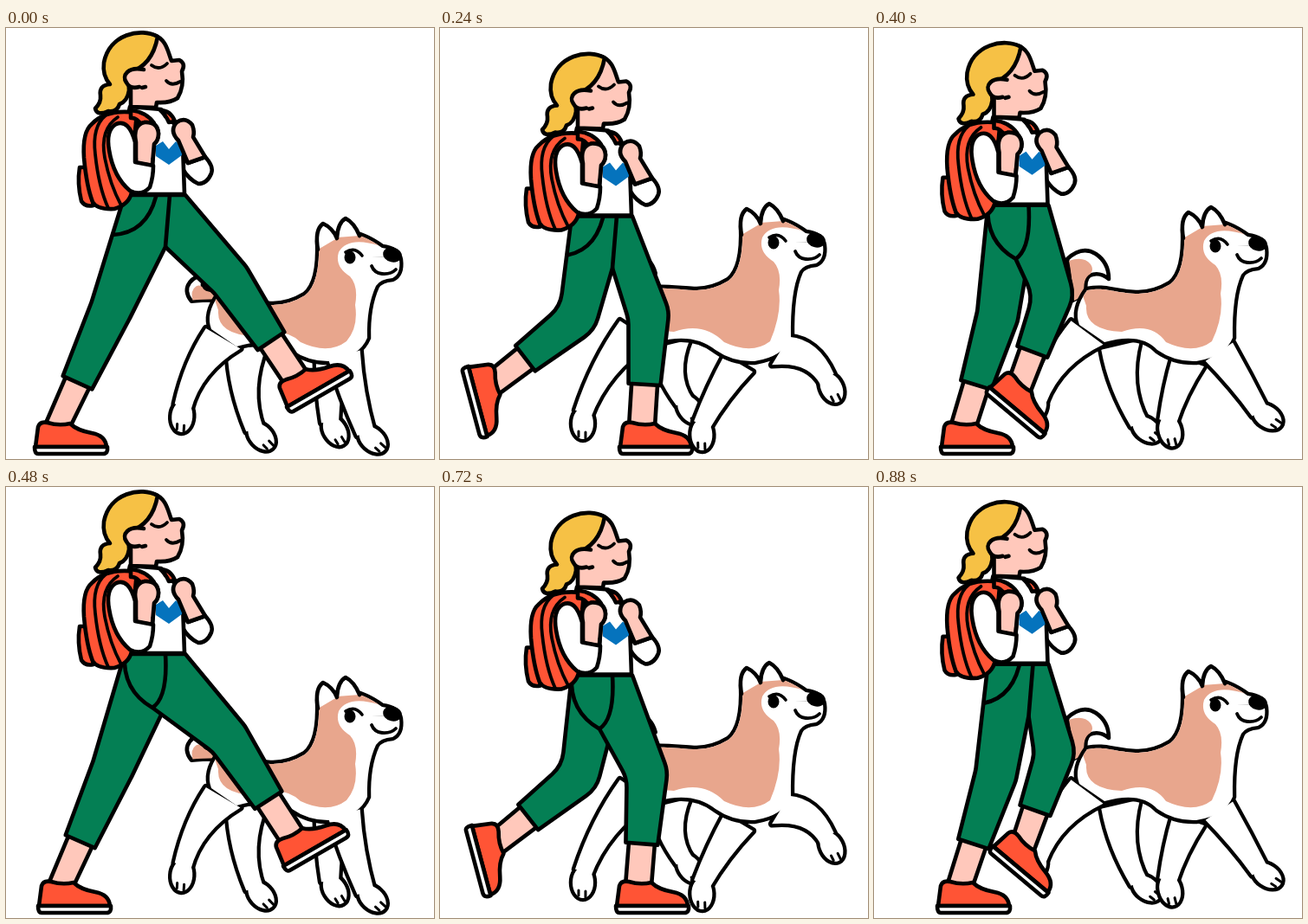
An HTML page with a canvas for the animation above (0.96 s loop, 494 px wide and 498 px high).

```html
<!DOCTYPE html>
<html lang="en">
<head>
<meta charset="utf-8">
<title>Walking the dog</title>
<style>
html, body { margin: 0; width: 100%; height: 100%; overflow: hidden; background: #fff; }
canvas { display: block; }
</style>
</head>
<body>
<canvas id="stage" width="494" height="498"></canvas>
<script>
const ctx = document.getElementById('stage').getContext('2d');
const INK = '#000', RED = '#ff5435', GREEN = '#047f54', HAIR = '#f6c145',
      SKIN = '#ffc8bb', TAN = '#e8a68d', BLUE = '#0573bd', WHITE = '#fff';
const STEP = 80, HALF = 6, BEATS = [0, 2, 3, 5], LINE = 4.6;

// Four key points per half cycle; the second leg runs half a cycle later.
const bob = [[0, 0], [8, 5], [15, 24.5], [-5.5, 11.8]];
// x, y, tilt of the shoe and how far the knee pushes forward
const shoes = [
  [33, 492, 0, 2], [7, 456, 27, 14], [25, 393, 75, 37], [128, 421, 40, 40],
  [324, 445, -30, 13], [342, 460, -43, 6], [203, 492, 0, 33], [73, 492, 0, 6]];
const headPath = [[0, 0], [-19, -9], [-12, -17], [-3, -13]];
const rumpPath = [[238, 308], [207, 292], [222, 303], [238, 303]];
const tailTilt = [[-85], [-80], [-15], [0]];
const hindPaws = [[287, 464], [189, 463], [165, 446], [190, 428],
                  [204, 438], [270, 432], [282, 432], [306, 457]];
const forePaws = [[415, 468], [325, 465], [302, 459], [339, 455],
                  [374, 456], [426, 420], [447, 406], [445, 443]];

function at(keys, step) {
  const n = keys.length, beat = k => HALF * (k >> 2) + BEATS[k & 3];
  const s = step % beat(n);
  let i = n - 1;
  while (beat(i) > s) i--;
  const u = (s - beat(i)) / (beat(i + 1) - beat(i)), next = keys[(i + 1) % n];
  return keys[i].map((v, k) => v + (next[k] - v) * u);
}

const add = (p, q, k = 1) => [p[0] + q[0] * k, p[1] + q[1] * k];
const lerp = (p, q, t) => [p[0] + (q[0] - p[0]) * t, p[1] + (q[1] - p[1]) * t];
const rad = deg => deg * Math.PI / 180;
// Unit vector square to p-q, pointing forward when q is below p.
function normal(p, q) {
  const d = Math.hypot(q[0] - p[0], q[1] - p[1]);
  return [(q[1] - p[1]) / d, (p[0] - q[0]) / d];
}

function shape(path, fill, width = LINE) {
  const p = typeof path === 'string' ? new Path2D(path) : path;
  if (fill) { ctx.fillStyle = fill; ctx.fill(p); }
  if (width) { ctx.strokeStyle = INK; ctx.lineWidth = width; ctx.stroke(p); }
}

function merge(paths, fill) {
  paths.forEach(p => shape(p, null, 8.5));
  paths.forEach(p => shape(p, fill, 0));
}

function placed(x, y, deg, paint) {
  ctx.save();
  ctx.translate(x, y);
  ctx.rotate(rad(deg));
  paint();
  ctx.restore();
}

function shoe() {
  shape('M1,-8 L4,-31 Q6,-38 15,-36 Q28,-32 41,-35 Q49,-27 66,-24 Q82,-21 83,-8 Z', RED);
  shape('M0,-8 H84 Q85,0 79,0 H4 Q0,0 0,-8 Z', WHITE);
}

function girlLeg(step, body, near) {
  const [sx, y, tilt, push] = at(shoes, step), x = sx + (near ? 0 : 4);
  const c = Math.cos(rad(tilt)), s = Math.sin(rad(tilt));
  const onShoe = (u, v) => [x + u * c - v * s, y + u * s + v * c];
  const hip = add([172, 205], body), ankle = onShoe(26, -31);
  const n = normal(hip, ankle), knee = add(lerp(hip, ankle, 0.47), n, push);
  const cuff = lerp(knee, ankle, 0.62), m = normal(knee, ankle);
  return {
    near, body, knee, shoe: [x, y, tilt],
    back: [add(knee, n, -24), add(cuff, m, -18.5)],
    front: [add(cuff, m, 18.5), add(knee, n, 24)],
    shin: [add(cuff, m, -15), onShoe(11, -31), onShoe(41, -31), add(cuff, m, 15)]
  };
}

function drawLeg(leg, leading) {
  const { near, body, back, front } = leg;
  const shin = new Path2D(), p = new Path2D();
  leg.shin.forEach(q => shin.lineTo(...q));
  shape(shin, SKIN);
  placed(...leg.shoe, shoe);

  const left = add([137, 193], body), right = add([207, 193], body);
  const crotch = add([184, 253], body), seat = add([169, 255], body);
  const [x, y] = left;
  if (leading && !near) {
    p.moveTo(crotch[0] - 10, y);
    p.lineTo(...crotch);
  } else {
    p.moveTo(...left);
    if (leading) p.quadraticCurveTo(x - 3, y + 42, ...seat);
  }
  p.arcTo(...back[0], ...back[1], 40);
  p.lineTo(...back[1]);
  p.lineTo(...front[0]);
  const top = leading ? right : crotch;
  p.arcTo(...front[1], ...top, 40);
  p.lineTo(...top);
  if (!leading) p.lineTo(crotch[0] + 5, y);
  p.closePath();
  shape(p, GREEN);
  if (!near) return;
  ctx.save();
  ctx.clip(p);
  shape(leading
    ? `M${x + 47},${y} Q${x + 50},${y + 50} ${seat[0]},${seat[1]}`
    : `M${x - 14},${y + 46} Q${x + 25},${y + 44} ${x + 36},${y + 2}`, null);
  ctx.restore();
}

function upperBody() {
  // far sleeve and torso
  shape('M202,140 L210,156 L230,149 Q240,160 237,168 Q232,180 222,180 Q211,175 204,163 Z', WHITE);
  shape('M143,91 L179,94 L184,102 Q201,112 204,135 L206,192 L146,192 L140,105 Z', WHITE);
  shape('M173,136 L181,131 L188,140 L196,131 L203,137 V147 L188,158 L173,148 Z', BLUE, 0);
  // backpack
  shape('M92,161 L85,161 Q82,180 87,200 Q91,207 101,205 Z', RED);
  shape('M151,98 Q116,93 99,111 Q88,120 90,150 Q93,183 100,201 Q105,210 125,209 Q142,204 145,190 L149,120 Z', RED);
  shape('M115,101 Q99,114 103,146 Q107,184 118,208 M129,103 Q108,117 114,150 Q120,181 133,205', null, 3.8);
  shape('M144,95 Q162,97 171,110 L158,114 Q151,103 144,104 Z', RED);
  shape('M178,95 Q190,95 195,108 L188,109 Q184,100 178,95 Z', RED);
  // far hand
  shape('M210,156 L199,130 Q188,119 197,109 Q207,102 215,112 Q218,120 216,126 L230,149 Z', SKIN);
  // near arm
  shape('M150,156 L149,130 Q146,112 160,109 Q175,108 176,122 Q176,130 171,134 L169,159 Z', SKIN);
  shape('M149,155 L149,132 Q142,105 127,111 Q115,118 119,141 Q124,172 143,188 Q156,195 166,184 Q170,172 170,159 Z', WHITE);
  shape('M149,131 Q147,112 160,109 Q175,108 176,122 Q176,130 171,134 L170,150 L152,150 Z', SKIN, 0);
  shape('M150,153 V132 Q146,112 160,109 Q175,108 176,122 Q176,130 171,134 L169,157', null);
}

function head() {
  shape('M169,8 C184,12 186,28 190,38 L199,37 Q207,41 202,50 Q205,68 197,81 Q188,87 173,86 L172,92 L143,91 L143,60 Z', SKIN);
  shape('M174,10 C155,-1 118,7 112,40 Q110,55 119,65 Q106,66 108,78 Q109,86 102,93 Q104,102 117,96 Q127,98 130,88 Q139,85 141,72 L140,52 Q168,44 174,10 Z', HAIR);
  shape('M156,47 C140,44 132,55 138,63 Q142,71 157,67 L162,55 Z', SKIN, 0);
  shape('M158,48 C140,44 132,55 138,63 Q142,71 153,68 M156,69 L160,68', null);
  shape('M167,43 Q176,50 185,41', null, 3.8);
  shape('M184,61 Q190,68 200,62', null, 3.8);
}

// Curve from a to b that passes through k.
function bend(p, a, k, b) {
  const ctrl = add(lerp(a, b, -0.5), k, 2);
  ctrl[0] = 2 * k[0] - (a[0] + b[0]) / 2;
  ctrl[1] = 2 * k[1] - (a[1] + b[1]) / 2;
  p.quadraticCurveTo(...ctrl, ...b);
}

function dogLeg(root, paw, push, width) {
  const lift = Math.max(0, 450 - paw[1]);
  const n = normal(root, paw), knee = add(lerp(root, paw, 0.5), n, push);
  const m = normal(knee, paw);
  const edge = s => [add(root, n, s * width), add(knee, n, s * 14), add(paw, m, s * 10)];
  const l = edge(-1), r = edge(1), limb = new Path2D(), foot = new Path2D();
  limb.moveTo(...l[0]);
  bend(limb, ...l);
  limb.lineTo(...r[2]);
  bend(limb, r[2], r[1], r[0]);
  limb.closePath();
  const tilt = Math.atan2(paw[1] - knee[1], paw[0] - knee[0]) + rad(lift - 30);
  foot.ellipse(paw[0] + 11 * Math.cos(tilt), paw[1] + 11 * Math.sin(tilt), 18, 12, tilt, 0, 7);
  const toes = () => placed(...paw, tilt * 180 / Math.PI,
    () => shape('M21,-3 H28 M20,5 H26', null, 3));
  return { x: paw[0], paths: [limb, foot], toes };
}

function hindLeg(step, [rx, ry]) {
  const paw = at(hindPaws, step), reach = paw[0] - rx;
  return dogLeg([rx + 24 + reach / 3, ry + 55 + reach / 8], paw, -7, 23);
}

function foreLeg(step, hx) {
  const paw = at(forePaws, step), reach = paw[0] - hx - 390;
  return dogLeg([382 + hx + reach / 3, 380 - reach / 10], paw,
    Math.max(0, 455 - paw[1]) / 4 - 2, 19);
}

function tail([x, y], tilt) {
  placed(x, y, tilt, () => {
    const size = 1 + tilt / 240;
    ctx.scale(size, size);
    shape('M-9,12 Q-12,-20 -15,-36 Q2,-52 18,-42 Q33,-32 33,-13 Q22,-22 11,-17 Q4,-12 7,4 Z', WHITE, LINE / size);
    shape('M-7,12 Q-10,-20 -13,-34 Q4,-40 12,-30 Q16,-24 12,-19 Q2,-14 5,6 Z', TAN, 0);
  });
}

function dog(step) {
  const [hx, hy] = at(headPath, step), rump = at(rumpPath, step), [rx, ry] = rump;
  const h = (x, y) => `${x + hx},${y + hy}`;
  const r = (x, y) => `${x + rx},${y + ry}`;
  const byX = (a, b) => a.x - b.x;
  const [hindNear, hindFar] = [hindLeg(step, rump), hindLeg(step + HALF, rump)].sort(byX);
  const [foreFar, foreNear] = [foreLeg(step, hx), foreLeg(step + HALF, hx)].sort(byX);
  const near = [hindNear, foreNear];

  [hindFar, foreFar].forEach(leg => { merge(leg.paths, WHITE); leg.toes(); });
  tail(rump, at(tailTilt, step)[0]);

  const body = new Path2D(`M${h(361, 246)} Q${h(363, 295)} ${h(345, 309)}
    Q${h(325, 321)} ${h(305, 320)} C${h(275, 318)} ${r(30, -4)} ${r(8, 0)}
    Q${r(-8, 22)} ${r(-1, 40)} L${r(28, 60)}
    Q${r(70, 48)} ${330 + hx},372 Q${350 + hx},386 ${375 + hx},385
    Q${408 + hx},380 ${417 + hx},358 Q${h(416, 322)} ${h(427, 298)}
    Q${h(432, 290)} ${h(446, 289)} Q${h(456, 284)} ${h(454, 268)}
    Q${h(452, 256)} ${h(434, 254)} Q${h(412, 238)} ${h(396, 238)} Q${h(374, 238)} ${h(361, 246)} Z`);
  merge([body, ...near.flatMap(leg => leg.paths)], WHITE);
  near.forEach(leg => leg.toes());

  ctx.save();
  ctx.clip(body);
  shape(`M${h(350, 260)} L${h(372, 236)} L${h(425, 236)} L${h(432, 252)}
    Q${h(395, 240)} ${h(384, 259)} Q${h(379, 276)} ${h(397, 287)} Q${h(407, 298)} ${h(403, 320)}
    Q${h(407, 346)} ${393 + hx},362 Q${372 + hx},378 ${340 + hx},363
    Q${r(82, 36)} ${r(48, 48)} Q${r(5, 46)} ${r(7, 18)} L${r(-4, -14)} L${h(300, 300)} Z`, TAN, 0);
  ctx.restore();

  placed(hx, hy, 0, () => {
    shape('M360,256 Q356,233 366,226 Q377,231 382,243 M382,242 Q383,225 392,220 Q402,225 408,240', WHITE);
    const dots = new Path2D();
    dots.ellipse(446, 262, 11, 8.5, 0.2, 0, 7);
    dots.ellipse(397, 265, 6.5, 7.5, 0, 0, 7);
    shape(dots, INK, 0);
    shape('M392,259 Q403,252 411,263', null, 3.6);
    shape('M422,275 Q425,283 434,284 Q444,285 450,279', null, 3.8);
  });
}

function draw(time) {
  const step = Math.floor(time / STEP) % (2 * HALF), body = at(bob, step);
  ctx.fillStyle = WHITE;
  ctx.fillRect(0, 0, 494, 498);
  ctx.lineJoin = ctx.lineCap = 'round';
  dog(step);
  const far = girlLeg(step + HALF, body, false), near = girlLeg(step, body, true);
  const nearLeads = near.knee[0] > far.knee[0];
  drawLeg(far, !nearLeads);
  drawLeg(near, nearLeads);
  placed(...body, 0, upperBody);
  placed(body[0] + 1, body[1], 0, head);
}

function tick() {
  draw(performance.now());
  requestAnimationFrame(tick);
}
tick();
</script>
</body>
</html>
```
